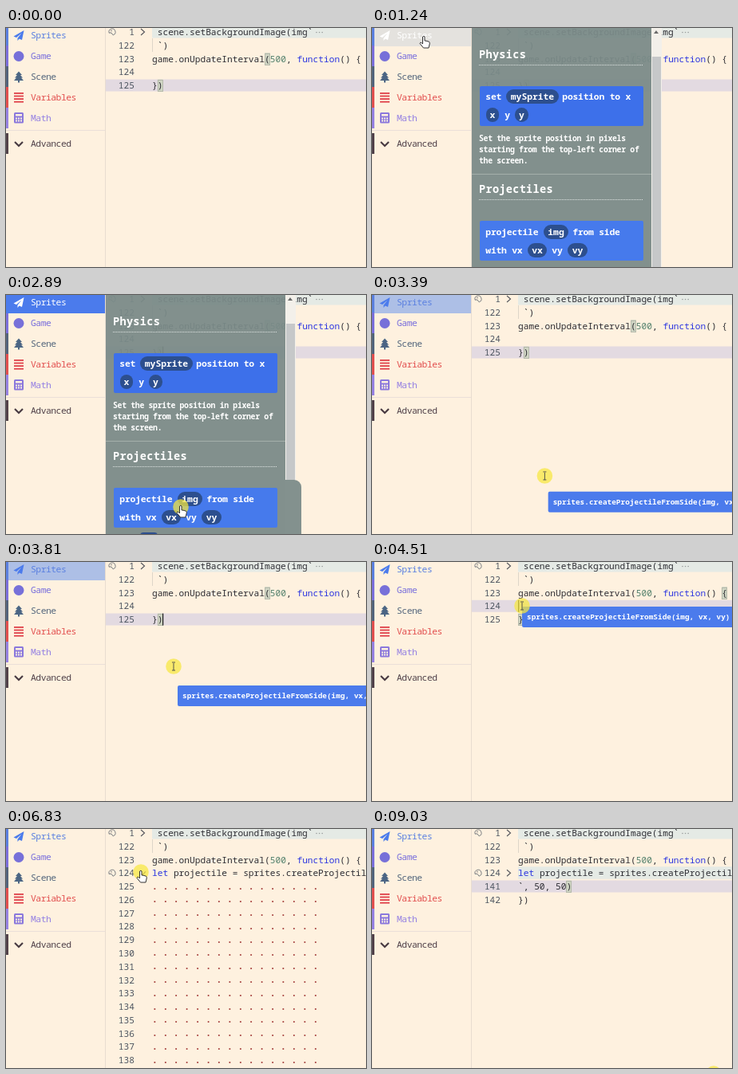
Write an HTML page with a canvas that moves like this. It is 451 px wide and 300 px high and loops after 9160 ms.

```html
<!DOCTYPE html>
<html lang="en">
<head>
<meta charset="utf-8">
<style>
html, body { margin: 0; width: 451px; height: 300px; overflow: hidden; background: #fef1df; }
canvas { display: block; }
</style>
</head>
<body>
<canvas width="451" height="300"></canvas>
<script>
const ctx = document.querySelector('canvas').getContext('2d');
const LOOP = 9160, CHAR = 6.72, LINE = 16.77, CODE_X = 183;
const PAPER = '#fef1df', BLUE = '#4b7bec', INK = '#2d2d33', PILL = '#2d4f8e';

// [time, x, y]: eased travel between consecutive points
const MOUSE = [[260, 384, 306], [1170, 65, 12], [1240, 65, 12], [2140, 167, 263], [2540, 167, 263],
  [2890, 219, 266], [3160, 219, 266], [3810, 210, 131], [4020, 207, 119], [4090, 207, 119],
  [4510, 188, 55], [5460, 188, 55], [6090, 169, 54], [7710, 169, 54], [8480, 421, 307], [9030, 428, 307]];
const DRAG = [[3230, 222, 268], [3810, 215, 155], [4020, 209, 136], [4090, 209, 136], [4510, 188, 56]];
const PRESSED = [[1030, 1100], [2210, 4710], [6830, 6960], [9030, LOOP]];

const MENU = [['Sprites', '#5b80e0', 9], ['Game', '#7b70dc', 35], ['Scene', '#53657c', 61],
  ['Variables', '#e2504f', 87], ['Math', '#9682e2', 113], ['Advanced', '#51424a', 145]];

function along(path, t) {
  let i = 1;
  while (i < path.length - 1 && t > path[i][0]) i++;
  const [t0, x0, y0] = path[i - 1], [t1, x1, y1] = path[i];
  const p = Math.min(1, Math.max(0, (t - t0) / (t1 - t0)));
  const k = p * p * (3 - 2 * p);
  return [x0 + (x1 - x0) * k, y0 + (y1 - y0) * k];
}

function rect(x, y, w, h, color, radius = 0) {
  ctx.fillStyle = color;
  ctx.beginPath();
  ctx.roundRect(x, y, w, h, radius);
  ctx.fill();
}

function disc(x, y, r, color) {
  ctx.fillStyle = color;
  ctx.beginPath();
  ctx.arc(x, y, r, 0, 7);
  ctx.fill();
}

function stroke(points, color, width = 1) {
  ctx.strokeStyle = color;
  ctx.lineWidth = width;
  ctx.beginPath();
  points.forEach(([x, y]) => ctx.lineTo(x, y));
  ctx.stroke();
}

function fillPath(d, x, y, color, outline) {
  ctx.save();
  ctx.translate(x, y);
  const path = new Path2D(d);
  ctx.fillStyle = color;
  ctx.fill(path);
  if (outline) {
    ctx.strokeStyle = outline;
    ctx.lineWidth = 1;
    ctx.stroke(path);
  }
  ctx.restore();
}

// y is the middle of the text line
function text(str, x, y, color, size = 11.2, weight = 400, spacing = 0) {
  ctx.font = `${weight} ${size}px "Noto Sans Mono", monospace`;
  ctx.letterSpacing = spacing + 'px';
  ctx.fillStyle = color;
  ctx.fillText(str, x, y + size * .36);
}

const rowY = row => 5 + row * LINE;
const colX = col => CODE_X + col * CHAR;
const code = (str, row, col = 0, color = INK) => text(str, colX(col), rowY(row), color);

function lineNumber(n, row) {
  const label = String(n);
  text(label, 161 - label.length * CHAR, rowY(row), '#4d5560');
}

const currentLine = row => rect(125, rowY(row) - 7.5, 326, 15, '#e3dae1');

function bracket(row, col) {
  rect(colX(col), rowY(row) - 7.5, CHAR, 15, '#d0d6c4');
  ctx.strokeStyle = '#b5b9ab';
  ctx.lineWidth = 1;
  ctx.strokeRect(Math.round(colX(col)) + .5, Math.round(rowY(row) - 7) + .5, 6, 14);
}

const foldedLine = row => rect(CODE_X, rowY(row) - 8, 268, 15.5, '#e5eae5');

function foldArrow(row, open) {
  const y = rowY(row);
  stroke(open ? [[167, y - 2], [171, y + 2], [175, y - 2]] : [[169, y - 4], [173.5, y], [169, y + 4]], '#5a5a60', 1.2);
}

function paletteIcon(row) {
  const y = rowY(row);
  ctx.strokeStyle = '#777b80';
  ctx.lineWidth = 1;
  ctx.beginPath();
  ctx.arc(133, y, 4, 2.8, 7.6);
  ctx.lineTo(132, y + 1);
  ctx.lineTo(129, y + 1);
  ctx.stroke();
  disc(132, y - 1.5, .8, '#777b80');
}

function projectileLine() {
  code('let', 3, 0, '#2b35e0');
  code('projectile = sprites.createProjectile(img`', 3, 4);
}

function drawEditor(t) {
  const dropped = t >= 4710, folded = t >= 6960, aiming = t >= 4370 && !dropped;
  foldedLine(0);
  rect(CODE_X, 13, 1, 17, '#ded5c8');
  if (folded) foldedLine(3);
  if (aiming) {
    currentLine(3);
    bracket(2, 38);
    bracket(4, 0);
  } else if (folded) {
    currentLine(4);
    bracket(4, 9);
  } else if (!dropped) {
    currentLine(4);
    bracket(2, 21);
    bracket(4, 1);
  }

  lineNumber(1, 0);
  lineNumber(122, 1);
  lineNumber(123, 2);
  lineNumber(124, 3);
  foldArrow(0, false);
  if (t < 4710 || t >= 5050) paletteIcon(0);

  code('scene.setBackgroundImage(img`', 0, 1);
  for (let i = 0; i < 3; i++) disc(389 + i * 3.6, 5.5, .8, '#999d9b');
  code('`)', 1, 1);
  code('game.onUpdateInterval(', 2);
  code('500', 2, 22, '#52806c');
  code(',', 2, 25);
  code('function', 2, 27, '#2b35e0');
  code('() {', 2, 35);

  if (!dropped) {
    lineNumber(125, 4);
    code('})', 4);
  } else {
    if (t >= 5310 && t < 5980) rect(colX(4), 50, CHAR * 10, 13, '#e4dbcf');
    projectileLine();
    foldArrow(3, !folded);
    if (t >= 5050) paletteIcon(3);
    if (folded) {
      lineNumber(141, 4);
      code('`,', 4);
      code('50', 4, 3);
      code(',', 4, 5);
      code('50', 4, 7);
      code(')', 4, 9);
      lineNumber(142, 5);
      code('})', 5);
    } else {
      for (let row = 4; row < 18; row++) {
        lineNumber(121 + row, row);
        text('. '.repeat(16), CODE_X, rowY(row) - .5, '#a03634', 11.2, 700);
      }
    }
  }

  const blink = Math.floor(t / 530) % 2 && t < 8480;
  if (aiming) rect(CODE_X, rowY(3) - 7.5, 1.3, 15, '#222');
  else if (blink && (!dropped || folded)) rect(colX(folded ? 10 : 2) - .5, rowY(4) - 7.5, 1.3, 15, '#222');
}

function drawMenu(t) {
  rect(0, 0, 125, 300, PAPER);
  rect(124, 0, 1, 300, '#e8dcd0');
  rect(0, 128, 124, 1, '#eadfd8');

  const hover = t >= 1030 && t < 1310, selected = t >= 1310 && t < 3300, fading = t >= 3300 && t < 4300;
  MENU.forEach(([, color, y], i) => rect(0, i ? y - 13 : 0, 3, i ? 26 : 22, color));
  if (hover) rect(3, 0, 121, 23, '#e4e2de');
  if (selected) rect(0, 0, 124, 23, BLUE);
  if (fading) rect(3, 0, 121, 23, '#adbfe6');
  MENU.forEach(([name, color, y], i) => {
    text(name, 31, y, !i && (hover || selected) ? '#fff' : color, 11.4, 400, -.51);
  });

  const plane = hover || selected ? '#fff' : BLUE;
  fillPath('M13 0 L0 7.5 L3.5 9 L10 3.5 L5 9.7 V13 L7 10.6 L10.5 12 Z', 9.5, 3, plane);
  disc(16, 35.5, 6.5, '#7770d9');
  fillPath('M6 0 L10 4.5 H8 L11 8 H9 L12 11.5 H7 V14 H5 V11.5 H0 L3 8 H1 L4 4.5 H2 Z', 10, 54.5, '#4b6584');
  for (let i = 0; i < 4; i++) rect(10, 81 + i * 3.6, 12, 1.8, '#df4049');
  rect(10, 106, 12, 13.5, '#8b78dc', 1.5);
  rect(12, 108, 8, 2.5, PAPER);
  for (let i = 0; i < 6; i++) rect(12 + i % 3 * 3, 112.5 + (i > 2) * 3, 2, 2, PAPER);
  stroke([[11, 143], [16, 148], [21, 143]], '#493b42', 2.2);
}

function heading(str, y) {
  text(str, 134, y, '#fff', 13.6, 600, .29);
  ctx.setLineDash([1, 1]);
  stroke([[134, y + 13.5], [340, y + 13.5]], '#dfe4e2');
  ctx.setLineDash([]);
}

const blockText = (str, x, y) => text(str, x - .7, y, '#fff', 11.4, 600, -.24);

function pill(str, x, y, w) {
  rect(x, y - 9, w, 18, PILL, 9);
  text(str, x + w / 2 - str.length * 3.4, y, '#fff', 11.4, 700, -.04);
}

function drawToolbox(t) {
  const shade = 'rgba(123,139,137,.94)';
  rect(125, 0, 225, 300, shade);
  rect(350, 0, 13, 300, '#f3f0ea');
  rect(351, 36, 11, 264, '#c6c8c9');
  fillPath('M0 4 L3 0 L6 4 Z', 353, 3, '#6a6a6a');
  if (t >= 1800) rect(350, 232, 20, 68, '#83918e', [0, 9, 0, 0]);

  heading('Physics', 33);
  rect(135, 73, 205, 50, '#3d70ea', 2);
  blockText('set', 143, 86);
  pill('mySprite', 168, 86, 66);
  blockText('position to x', 239, 86);
  pill('x', 143, 109, 16);
  blockText('y', 167, 109);
  pill('y', 179, 109, 17);
  ['Set the sprite position in pixels', 'starting from the top-left corner of', 'the screen.']
    .forEach((str, i) => text(str, 134, 138 + i * 14, '#fff', 9.8, 600, -.31));

  rect(125, 183, 225, 1, '#a5afab');
  heading('Projectiles', 202);
  rect(135, 242, 205, 50, '#467aec', 2);
  blockText('projectile', 143, 256);
  pill('img', 215, 256, 31);
  blockText('from side', 252, 256);
  blockText('with vx', 143, 279);
  pill('vx', 195, 279, 24);
  blockText('vy', 226, 279);
  pill('vy', 245, 279, 25);
  if (t >= 1800) rect(168, 298, 22, 8, PILL, 4);
}

function drawDraggedBlock(t) {
  const [x, y] = along(DRAG, t);
  rect(x, y, 270, 26, BLUE, 2);
  text('sprites.createProjectileFromSide(img, vx, vy)', x + 6, y + 13, '#fff', 9.4, 700, .03);
}

function drawMouse(t, toolbox) {
  if (t < 260) return;
  const [x, y] = along(MOUSE, t);
  if (PRESSED.some(([from, to]) => t >= from && t < to)) disc(x, y, 9.8, 'rgba(246,232,62,.72)');
  if (x < 180 || toolbox && x < 350) {
    fillPath('M0 0 Q1.5 -1.5 2.5 0 V5 L4.5 5.2 L8 6.2 Q9 7 8.7 9 L7.5 14 H1 L-3.5 8.5 Q-3 6.5 -1.5 7.5 L0 9 Z',
      x - 1.5, y - 1, '#fff', '#333');
  } else {
    stroke([[x, y - 4], [x, y + 5]], '#55554c');
    stroke([[x - 2, y - 5], [x + 2, y - 5]], '#55554c');
    stroke([[x - 2, y + 5], [x + 2, y + 5]], '#55554c');
  }
}

function draw(now) {
  const t = now % LOOP, toolbox = t >= 1100 && t < 3300;
  rect(0, 0, 451, 300, PAPER);
  drawEditor(t);
  drawMenu(t);
  if (toolbox) drawToolbox(t);
  if (t >= 3300 && t < 4710) drawDraggedBlock(t);
  drawMouse(t, toolbox);
  requestAnimationFrame(draw);
}
requestAnimationFrame(draw);
</script>
</body>
</html>
```
